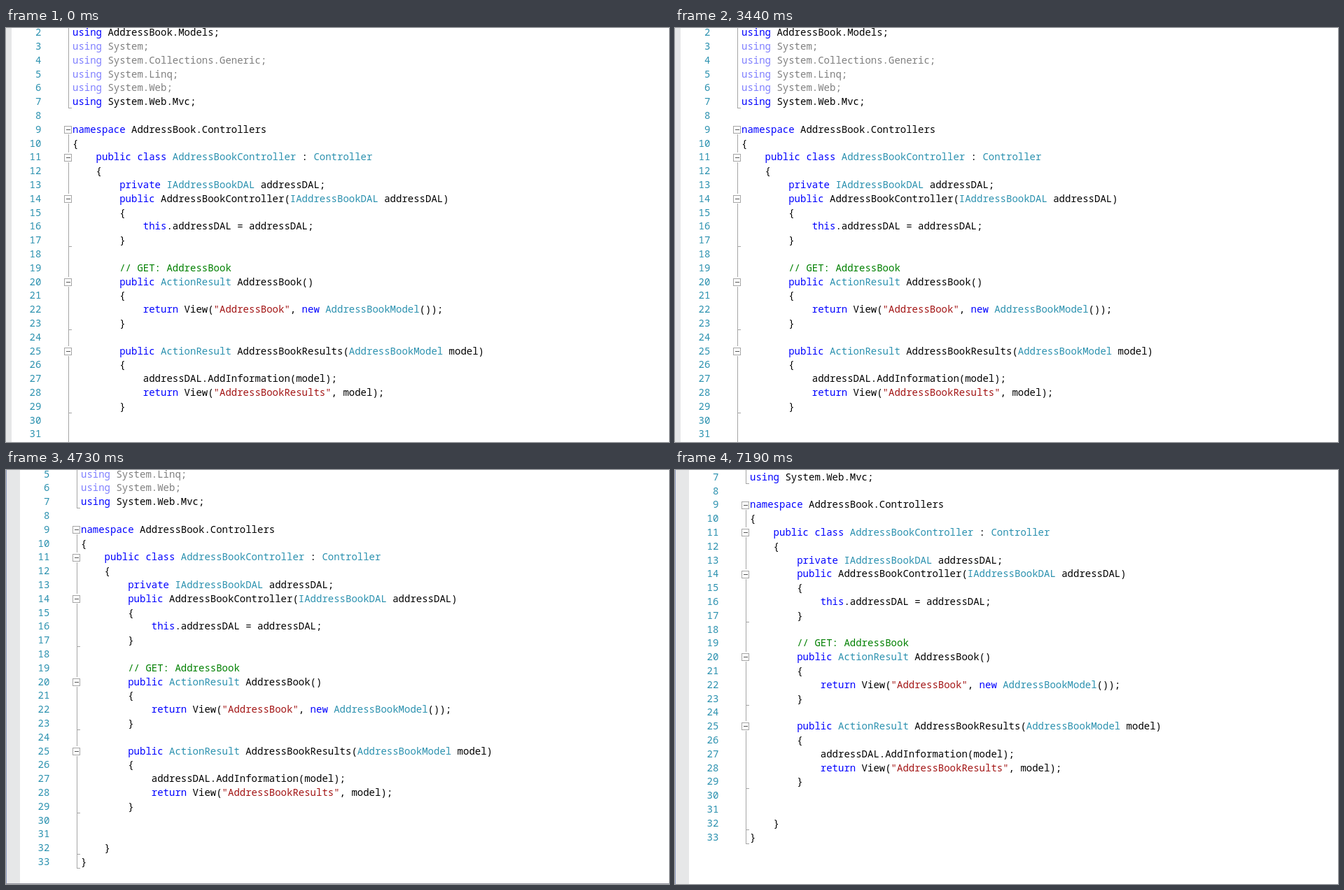
An HTML page with a canvas for the animation above (7940 ms loop, 947 by 592 pixels).

```html
<!DOCTYPE html>
<html lang="en">
<head>
<meta charset="utf-8">
<title>Code editor</title>
<style>
html, body { margin: 0; width: 100%; height: 100%; overflow: hidden; background: #fff; }
canvas { display: block; }
</style>
</head>
<body>
<canvas id="stage" width="947" height="592"></canvas>
<script>
const ctx = document.getElementById('stage').getContext('2d');
const W = 947, H = 592, LOOP = 7940, TICK = 120, PITCH = 19.8, FIRST = 2;
const TEAL = '#2b91af', OUTLINE = '#a5a5a5';

const lines = `using AddressBook.Models;
using System;
using System.Collections.Generic;
using System.Linq;
using System.Web;
using System.Web.Mvc;

namespace AddressBook.Controllers
{
    public class AddressBookController : Controller
    {
        private IAddressBookDAL addressDAL;
        public AddressBookController(IAddressBookDAL addressDAL)
        {
            this.addressDAL = addressDAL;
        }

        // GET: AddressBook
        public ActionResult AddressBook()
        {
            return View("AddressBook", new AddressBookModel());
        }

        public ActionResult AddressBookResults(AddressBookModel model)
        {
            addressDAL.AddInformation(model);
            return View("AddressBookResults", model);
        }


    }
}`.split('\n');

const keyword = /^(using|namespace|public|class|private|this|return|new)$/;
const token = /(\/\/.*|"[^"]*"|\b(?:using|namespace|public|class|private|this|return|new)\b|\bI?AddressBook(?:DAL|Model)\b|\bActionResult\b|(?<=class )AddressBookController|(?<=: )Controller\b)/;

// Pointer moves: start time, ticks, destination, sideways bend.
const moves = [
  { at: 250, ticks: 2, x: 929, y: 584 },
  { at: 1250, ticks: 2, x: 926, y: 584 },
  { at: 1620, ticks: 4, x: 860, y: 508 },
  { at: 2230, ticks: 1, x: 856, y: 498 },
  { at: 2480, ticks: 7, x: 743, y: 119, bend: 15 },
  { at: 3320, ticks: 1, x: 728, y: 48 },
  { at: 6110, ticks: 1, x: 833, y: 6 },
  { at: 6230, ticks: 6, x: 743, y: 391, bend: 130 },
  { at: 6950, ticks: 2, x: 728, y: 451 }
];

// Progress from 0 to 1 in equal held ticks, the first one taken at the start time.
function ramp(t, start, ticks) {
  const done = Math.floor((t - start) / TICK) + 1;
  return Math.min(Math.max(done, 0), ticks) / ticks;
}

function rect(color, x, y, w, h) {
  ctx.fillStyle = color;
  ctx.fillRect(x, y, w, h);
}

function tokenColor(part, isToken, dim) {
  if (!isToken) return dim ? '#7f7f7f' : '#000';
  if (part[0] === '/') return '#008000';
  if (part[0] === '"') return '#a31515';
  if (keyword.test(part)) return dim ? '#7f7fff' : '#00f';
  return TEAL;
}

function drawOutline(dx, lineY) {
  const x = 89 + Math.round(dx);
  const foot = n => Math.round(lineY(n) + 9);
  const top = Math.round(lineY(9));
  rect(OUTLINE, x, 0, 1, foot(7));
  rect(OUTLINE, x, foot(7), 5, 1);
  rect(OUTLINE, x, top, 1, foot(33) - top);
  lines.forEach((line, i) => {
    const n = i + FIRST, y = Math.round(lineY(n));
    if (line.trim() === '}') rect(OUTLINE, x, foot(n), 5, 1);
    if (lines[i + 1]?.trim() !== '{') return;
    rect('#fff', x - 6, y - 7, 12, 14);
    ctx.strokeStyle = OUTLINE;
    ctx.strokeRect(x - 5.5, y - 4.5, 10, 10);
    rect('#555', x - 3, y, 6, 1);
  });
}

function drawCode(dx, lineY) {
  ctx.font = '14px "Noto Sans Mono", "DejaVu Sans Mono", monospace';
  const advance = ctx.measureText('0').width;
  lines.forEach((line, i) => {
    const n = i + FIRST, y = Math.round(lineY(n) + 4.8), dim = n > 2 && n < 7;
    ctx.textAlign = 'right';
    ctx.fillStyle = TEAL;
    ctx.fillText(n, 50.3 + dx, y);
    ctx.textAlign = 'left';
    let col = 0;
    line.split(token).forEach((part, k) => {
      ctx.fillStyle = tokenColor(part, k % 2, dim);
      ctx.fillText(part, 95 + dx + col * advance, y);
      col += part.length;
    });
  });
}

function drawPointer(t) {
  if (!(t >= 250 && t < 3440 || t >= 6110 && t < 7190)) return;
  let x = 933, y = 584;
  for (const move of moves) {
    const p = ramp(t, move.at, move.ticks);
    x += (move.x - x) * p + (move.bend || 0) * Math.sin(Math.PI * p);
    y += (move.y - y) * p;
  }
  x = Math.round(x);
  y = Math.round(y);
  const color = '#333';
  rect(color, x, y - 6, 1, 13);
  for (const edge of [y - 7, y + 7]) {
    rect(color, x - 3, edge, 3, 1);
    rect(color, x + 1, edge, 3, 1);
  }
}

function draw(t) {
  const pan = ramp(t, 4250, 5), scroll = ramp(t, 4980, 3);
  const dx = 12 * pan ** 0.7;
  const dy = -60 * Math.max(0, 1.13 * pan - 0.13) - 35.5 * scroll;
  const lineY = n => 145 + (n - 9) * PITCH + dy;
  rect('#fff', 0, 0, W, H);
  rect('#e6e7e8', 0, 0, 8 + dx, H);
  drawOutline(dx, lineY);
  drawCode(dx, lineY);
  if (pan === 1) {
    rect('#8f9bc0', 0, 0, 1, H);
    if (t < 5490) rect('#92929c', 0, H - 1, scroll ? 46 : W, 1);
  }
  drawPointer(t);
}

function frame() {
  draw(performance.now() % LOOP);
  requestAnimationFrame(frame);
}
frame();
</script>
</body>
</html>
```
